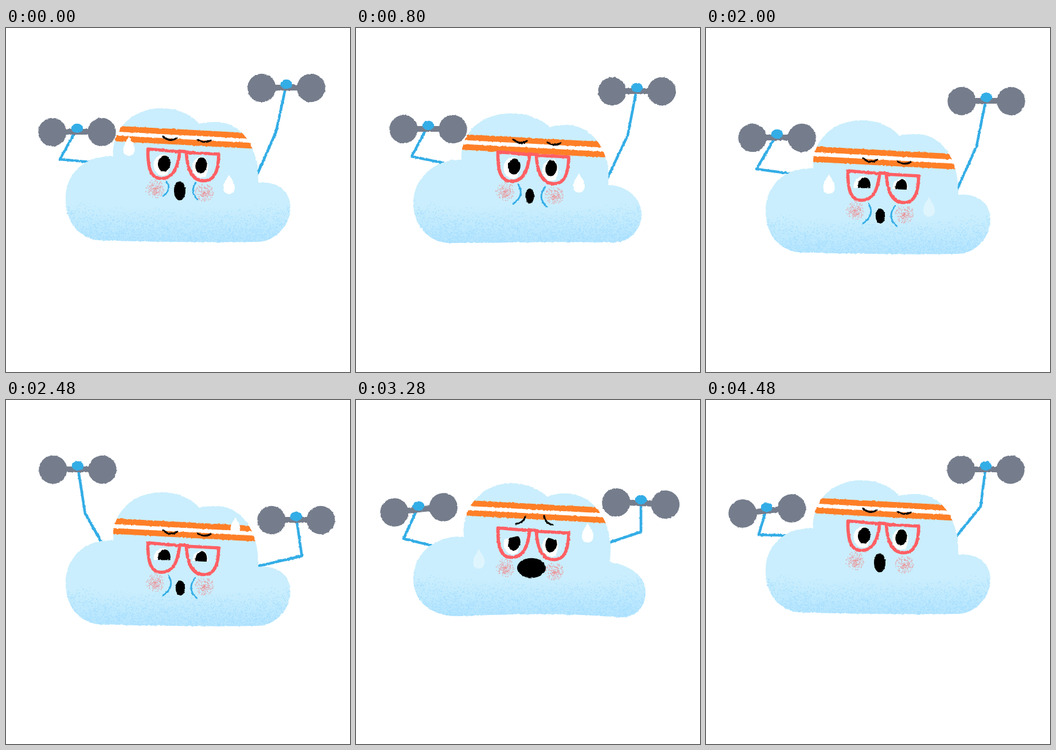
These frames come from a looping animation (600 by 600 pixels, 4560 ms). An HTML page:

```html
<!DOCTYPE html>
<html lang="en">
<head>
<meta charset="utf-8">
<title>Cloud workout</title>
<style>
  html, body { margin: 0; width: 100%; height: 100%; overflow: hidden; background: #fff; }
  svg { display: block; width: 100vw; height: 100vh; }
</style>
</head>
<body>
<svg viewBox="0 0 600 600">
  <defs>
    <filter id="rough" filterUnits="userSpaceOnUse" x="0" y="0" width="600" height="600" color-interpolation-filters="sRGB">
      <feTurbulence type="fractalNoise" baseFrequency=".22" numOctaves="2" seed="4"/>
      <feDisplacementMap in="SourceGraphic" scale="3" xChannelSelector="R" yChannelSelector="G"/>
    </filter>
    <linearGradient id="fade" gradientUnits="userSpaceOnUse" x1="0" y1="310" x2="0" y2="380">
      <stop offset="0" stop-color="#a8dfff" stop-opacity="0"/>
      <stop offset="1" stop-color="#a8dfff" stop-opacity=".6"/>
    </linearGradient>
    <clipPath id="inCloud"><path id="cloudClip"/></clipPath>
    <clipPath id="lids"><path id="lidShape"/></clipPath>
    <path id="drop" d="M0-17C3-10 10-4 10 6C10 13 6 17 0 17S-10 13-10 6C-10-4-3-10 0-17Z"/>
    <g id="weight">
      <path d="M-43 6H43" stroke="#757d8c" stroke-width="10"/>
      <circle cx="-43" cy="6.5" r="24.7" fill="#757d8c"/>
      <circle cx="43" cy="6.5" r="24.7" fill="#757d8c"/>
      <ellipse rx="10.3" ry="8.2" fill="#33ade6"/>
    </g>
  </defs>
  <g filter="url(#rough)" fill="none" stroke-linecap="round" stroke-linejoin="round">
    <g stroke="#33ade6" stroke-width="4.6"><path id="armL"/><path id="armR"/></g>
    <path id="cloud" fill="#caeefd"/>
    <g clip-path="url(#inCloud)">
      <g id="shade">
        <path d="M90 300H515V385H90Z" fill="url(#fade)"/>
        <path id="grain" stroke="#a5deff" stroke-width="1.3" stroke-linecap="butt"/>
      </g>
      <g id="band" stroke-linecap="butt">
        <path d="M170 12.4L460 28" stroke="#fff" stroke-width="12"/>
        <path d="M170 4L460 19.6M170 21L460 36.6" stroke="#ff7f27" stroke-width="10"/>
      </g>
    </g>
    <g id="face">
      <g id="cheeks" stroke="#ee8d8f" stroke-width="1.1" stroke-linecap="butt"></g>
      <g clip-path="url(#lids)">
        <g fill="#fff">
          <ellipse cx="273.5" cy="239" rx="16" ry="18.5"/>
          <ellipse cx="341" cy="243" rx="16" ry="18.5"/>
        </g>
        <g stroke="#caeefd" stroke-width="4"><path d="M283 224Q292 236 284 253M350 228Q359 240 351 257"/></g>
        <g fill="#000">
          <ellipse cx="276" cy="236.5" rx="10.8" ry="14" transform="rotate(8 276 236)"/>
          <ellipse cx="340.5" cy="239.5" rx="10" ry="14" transform="rotate(8 340 239)"/>
        </g>
      </g>
      <path stroke="#ff5f63" stroke-width="5.6" d="M247.5 211C247 241 251 262.500 271 262.500C293 262.500 300 241 303 216ZM314.500 217C316 245 324 266.500 345 266.500C366 266.500 370.500 245 371 220ZM302 214.500L316 216"/>
      <path id="brows" stroke="#000" stroke-width="3.2"/>
      <path id="puffs" stroke="#33ade6" stroke-width="2.8"/>
      <ellipse id="mouth" fill="#000"/>
    </g>
    <g id="drops" fill="#fff"></g>
    <use id="weightL" href="#weight"/><use id="weightR" href="#weight"/>
  </g>
</svg>
<script>
const FRAME = 80, COUNT = 57, STRAIN = 36;
const $ = id => document.getElementById(id);
const set = (id, attrs) => { for (const k in attrs) $(id).setAttribute(k, attrs[k]); };
const clamp = v => Math.max(0, Math.min(1, v));

// Blends numbers, arrays or plain objects of the same layout.
function mix(a, b, t) {
  if (typeof a === 'number') return a + (b - a) * t;
  if (Array.isArray(a)) return a.map((v, i) => mix(v, b[i], t));
  return Object.fromEntries(Object.keys(a).map(k => [k, mix(a[k], b[k], t)]));
}

// Cloud outlines: a start point followed by cubic segments.
const tall = [158,370, 120,362,104,332,104,297, 104,255,137,221,187,224, 184,172,225,140,271,140,
  300,140,325,152,337,167, 348,164,358,164,368,164, 410,165,442,206,440,270,
  470,266,496,283,496,312, 496,346,470,371,440,373, 345,374,250,373,158,370];
const wide = [165,375, 125,375,100,342,100,305, 100,262,140,227,184,230, 182,180,220,149,271,149,
  300,149,325,160,338,173, 348,170,358,169,368,169, 412,170,446,215,440,274,
  472,274,498,297,498,325, 498,353,475,374,450,374, 350,372,250,375,165,375];
const saggy = [180,377, 130,378,100,350,100,312, 100,270,135,236,188,238, 184,187,220,145,271,145,
  300,145,322,158,334,169, 345,163,357,163,368,163, 415,164,454,217,442,282,
  475,288,505,305,505,334, 505,365,485,379,462,379, 350,370,260,374,180,377];

const pose = (shape, y, band, face, mouth, puff) => ({ shape, y, band, face, mouth, puff });
const up = pose(tall, 0, 169, 0, [303, 284, 10, 16.5], 0);
const mid = pose(wide, 0, 184, 5, [303, 288, 7.6, 13], 1);
const low = pose(tall, 21, 205, 38, [304, 290, 8.2, 13], 1.1);
const tired = pose(saggy, 0, 173, 12, [306, 281, 25, 17.2], 0);
const sunk = pose(saggy, 25, 202, 40, [306, 281, 24, 15], 0);
const bob = [up, low, low, mix(low, mid, .6), mid, mix(mid, up, .6)];

// Arms: hand, elbow, shoulder, tilt of the weight.
const shift = (arm, dx, dy) => arm.map((v, i) => i > 3 ? v : v + (i % 2 ? dy : dx));
const left = {
  up: [127, 88, 133, 164, 185, 260, 0], upLow: [125, 115, 138, 198, 185, 280, 0],
  down: [126, 170, 97, 224, 170, 239, 0], rest: [124, 175, 94, 229, 170, 236, 0],
  downLow: [124, 185, 88, 246, 170, 257, 0],
  tired: [109, 185, 83, 242, 150, 258, -6], end: [106, 187, 92, 235, 160, 237, -6]
};
const right = {
  up: [490, 104, 474, 187, 425, 290, 0], rest: [489, 98, 471, 181, 425, 285, 0],
  upLow: [489, 121, 472, 206, 425, 310, 0],
  down: [504, 179, 516, 244, 400, 282, 0], downLow: [506, 203, 516, 272, 400, 299, 0],
  tired: [497, 174, 497, 230, 420, 256, 2.5], end: [488, 115, 479, 186, 420, 258, 0]
};
const pumpL = [left.rest, left.downLow, shift(left.downLow, -3, 3), shift(left.up, 0, -8), left.up,
  shift(left.up, 0, -8), mix(left.up, left.upLow, .2), left.upLow, mix(left.upLow, left.down, .6),
  shift(left.down, 0, -5), left.down, mix(left.down, left.rest, .5)];
const pumpR = [right.rest, right.upLow, mix(right.upLow, right.down, .6), shift(right.down, 0, -4), right.down,
  right.down, mix(right.down, right.downLow, .3), right.downLow, shift(right.downLow, 1, 3),
  shift(right.up, 0, -21), right.up, mix(right.up, right.rest, .5)];

const state = (body, l, r) => ({ body, l, r });
const held = state(tired, left.tired, right.tired);
const dipped = state(sunk, shift(left.tired, -3, 18), shift(right.tired, 3, 18));
const strain = [[36, state(up, left.rest, right.rest)], [38, dipped], [41, held], [44, dipped],
  [47, held], [51, dipped], [54, state(up, left.end, mix(right.tired, right.end, .6))],
  [56, state(up, left.end, right.end)]];

function stateAt(f) {
  if (f <= STRAIN) return state(bob[f % 6], pumpL[f % 12], pumpR[f % 12]);
  const i = strain.findIndex(k => k[0] >= f), [f0, a] = strain[i - 1], [f1, b] = strain[i];
  return mix(a, b, (f - f0) / (f1 - f0));
}

const outline = p => {
  let d = `M${p[0]} ${p[1]}`;
  for (let i = 2; i < p.length; i += 6) d += 'C' + p.slice(i, i + 6).join(' ');
  return d + 'Z';
};

function drawArm(side, a) {
  set('arm' + side, { d: `M${a[0]} ${a[1]}L${a[2]} ${a[3]}L${a[4]} ${a[5]}` });
  set('weight' + side, { transform: `translate(${a[0]} ${a[1]}) rotate(${a[6]})` });
}

const LIDS = {
  open: 'M240 200H380V280H240Z',
  squint: 'M240 200H380V245.500L307 242L240 240.500Z',
  sad: 'M240 280V233L258 231L292 223L326 226L362 235L380 237V280Z'
};
const BROWS = {
  calm: 'M274 189Q286 200 298 192M334 194.500Q346 202 357 196',
  sad: 'M295 191Q294 201 279 204M328 190Q329 202 343 206'
};

const dropTag = (x, y, alpha, size = 1) =>
  `<use href="#drop" transform="translate(${x} ${y}) scale(${size})" opacity="${clamp(alpha)}"/>`;

function drops(f, faceY) {
  let out = '';
  for (const start of [0, 12, 24, 36, 46]) {
    const t = f - start;
    if (t >= 0 && t < 6.3) out += dropTag(214.5, faceY + 206 + 62 * (1 - Math.exp(-.6 * t)), (6.3 - t) / 3.2);
  }
  for (const start of [-5, 7, 19, 31, 40.3]) {
    const t = f - start, fromHold = start < 40 ? 3 : 0;
    if (t < -fromHold || t > 6.6) continue;
    const y = t < 0 ? 181 - t * 5.3 : 181 + 94 * (1 - Math.exp(-.75 * t));
    const x = start < 40 ? 400 - 11 * clamp(t / 2) : 404;
    out += dropTag(x, faceY + y, (6.6 - t) / 1.5, t <= 0 ? .84 : 1);
  }
  return out;
}

function render(f) {
  const { body, l, r } = stateAt(f);
  const sad = f > STRAIN && f < 54, squint = !sad && body.face > 20;
  const path = outline(body.shape), moved = `translate(0 ${body.y})`;
  set('cloud', { d: path, transform: moved });
  set('cloudClip', { d: path, transform: moved });
  set('shade', { transform: moved });
  set('band', { transform: `translate(0 ${body.band + 1.5})` });
  set('face', { transform: `translate(0 ${body.face})` });
  set('lidShape', { d: squint ? LIDS.squint : sad ? LIDS.sad : LIDS.open });
  set('brows', { d: sad ? BROWS.sad : BROWS.calm });
  const [cx, cy, rx, ry] = body.mouth, p = body.puff;
  set('mouth', { cx, cy, rx, ry });
  set('puffs', {
    d: `M${280 + 3 * p} 268Q${290 + 5 * p} ${281 + 6 * p} 274 ${293 + 9 * p}` +
       `M${331 - p} ${270 + 2 * p}Q${320 - 5 * p} ${286 + 5 * p} ${334 - p} ${299 + 8 * p}`,
    visibility: f > STRAIN ? 'hidden' : 'visible'
  });
  drawArm('L', l);
  drawArm('R', r);
  $('drops').innerHTML = drops(f, body.face);
}

let seed = 7;
const rand = () => (seed = seed * 16807 % 2147483647) / 2147483647;

function buildTexture() {
  let grain = '';
  for (let i = 0; i < 14000; i++) {
    const x = 95 + rand() * 415, y = 285 + rand() * 98;
    const top = 312 - 24 * Math.abs((x - 300) / 200) ** 3;
    const depth = (y - top) / (378 - top);
    if (depth > 0 && rand() < depth ** 1.4) grain += `M${x.toFixed(1)} ${y.toFixed(1)}h1.3`;
  }
  set('grain', { d: grain });
  for (const [cx, cy] of [[259.5, 280.5], [345.5, 287]]) {
    let d = '';
    for (let i = 0; i < 230; i++) {
      const angle = rand() * 2 * Math.PI, dist = 16 * rand() ** .8;
      d += `M${(cx + dist * Math.cos(angle)).toFixed(1)} ${(cy + dist * Math.sin(angle)).toFixed(1)}h1`;
    }
    $('cheeks').insertAdjacentHTML('beforeend', `<path d="${d}"/>`);
  }
}

let shown = -1;
function tick() {
  const f = Math.floor(performance.now() / FRAME) % COUNT;
  if (f !== shown) render(shown = f);
  requestAnimationFrame(tick);
}
buildTexture();
tick();
</script>
</body>
</html>
```
